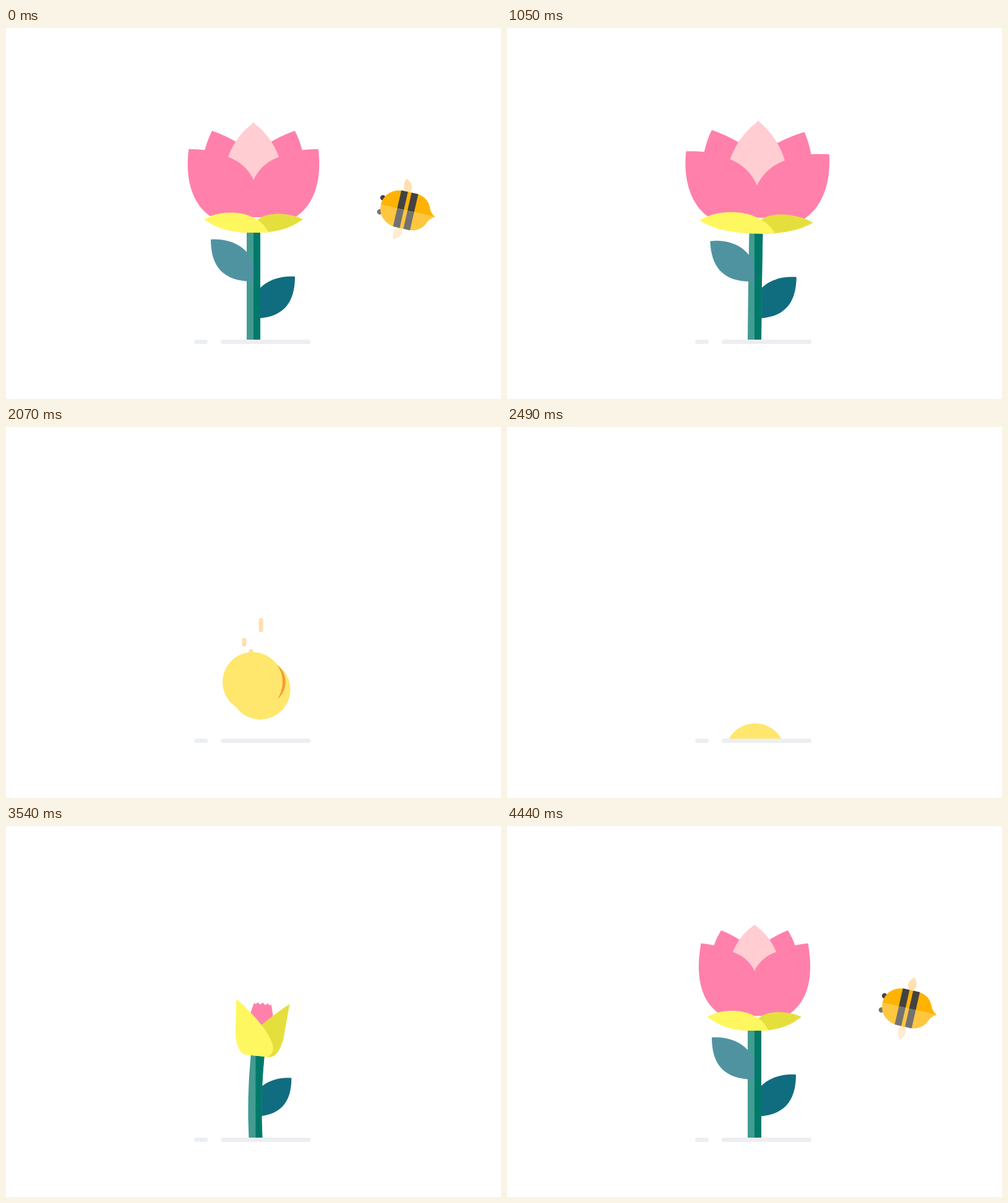
Recreate the animation shown at these times as an HTML page with a canvas. Size 800x600 px, loop 4.47 s.

```html
<!DOCTYPE html>
<html lang="en">
<head>
<meta charset="utf-8">
<title>Flower and bee</title>
<style>
html, body { margin: 0; width: 100%; height: 100%; overflow: hidden; background: #fff; }
canvas { display: block; }
</style>
</head>
<body>
<canvas id="stage" width="800" height="600"></canvas>
<script>
const ctx = document.getElementById('stage').getContext('2d');
const LOOP = 4470, STEP = 30, GROUND = 504, RAD = Math.PI / 180, TURN = 2 * Math.PI;

// ---------- easing and keys ----------
const smooth = u => u * u * (3 - 2 * u);
const linear = u => u;
const easeIn = u => u * u;
const easeOut = power => u => 1 - (1 - u) ** power;
const mix = (a, b, k) => a + (b - a) * k;
const span = (t, from, to) => Math.min(1, Math.max(0, (t - from) / (to - from)));

function backOut(u) {
  const s = 2.1, v = u - 1;
  return 1 + v * v * ((s + 1) * v + s);
}

// Keys are [time, values, easing into the key].
function track(keys, t) {
  const next = keys.findIndex(key => t <= key[0]);
  if (next === 0) return keys[0][1];
  if (next < 0) return keys[keys.length - 1][1];
  const [t0, a] = keys[next - 1], [t1, b, ease = smooth] = keys[next];
  const k = ease(span(t, t0, t1));
  return a.map((v, i) => mix(v, b[i], k));
}

// Times run from -1740 (sprouting) through 0 (in bloom) to 2520 (seed gone).
// petals: radius, fan angle in degrees
const petalKeys = [
  [-1200, [33, 6]],
  [-660, [140, 5]],
  [-540, [215, 5]],
  [-480, [208, 5]],
  [-120, [163, 12]],
  [-30, [171, 18.4], easeIn],
  [540, [182, 24.3], easeOut(18)]
];
// sepals: how far wrapped around the bud, tip distance out, tip height
const sepalKeys = [
  [-1200, [0, 35, 37]],
  [-660, [1, 51.5, 140]],
  [-540, [1, 51.5, 215]],
  [-480, [1, 51.5, 209]],
  [-30, [0, 76, 22]],
  [540, [0, 92, 19], easeOut(5.4)]
];
const ballKeys = [
  [1830, [-60]], [2070, [412.5], easeIn], [2100, [452], linear],
  [2220, [392], easeOut(2)], [2520, [560], easeIn]
];

// ---------- drawing helpers ----------
function fillShape(color, build) {
  ctx.fillStyle = color;
  ctx.beginPath();
  build();
  ctx.fill();
}

const disc = (color, x, y, r) => fillShape(color, () => ctx.arc(x, y, r, 0, TURN));

function bar(color, x0, y0, x1, y1) {
  ctx.strokeStyle = color;
  ctx.lineWidth = 7;
  ctx.lineCap = 'round';
  ctx.beginPath();
  ctx.moveTo(x0, y0);
  ctx.lineTo(x1, y1);
  ctx.stroke();
}

function placed(x, y, angle, sx, sy, draw) {
  ctx.save();
  ctx.translate(x, y);
  ctx.rotate(angle * RAD);
  ctx.scale(sx, sy);
  draw();
  ctx.restore();
}

function clipped(x, y, w, h, draw) {
  ctx.save();
  ctx.beginPath();
  ctx.rect(x, y, w, h);
  ctx.clip();
  draw();
  ctx.restore();
}

// ---------- flower ----------
function stem(x, y, tilt, foot) {
  const c = Math.cos(tilt * RAD), s = Math.sin(tilt * RAD), half = (GROUND - y) / 2, w = 11;
  const cx = x - s * half, cy = y + c * half;
  const shape = color => fillShape(color, () => {
    ctx.moveTo(foot - w, GROUND);
    ctx.quadraticCurveTo(cx - w, cy, x - w * c, y - w * s);
    ctx.lineTo(x + w * c, y + w * s);
    ctx.quadraticCurveTo(cx + w, cy, foot + w, GROUND);
  });
  shape('#429c91');
  clipped(foot, 0, 100, GROUND, () => shape('#00796b'));
}

function leaf(color, x, y, side, size, angle) {
  placed(x, y, angle, side * size, size, () => fillShape(color, () => {
    ctx.moveTo(-69, -68);
    ctx.bezierCurveTo(-38, -71, -5, -55, 0, -25);
    ctx.lineTo(0, 0);
    ctx.bezierCurveTo(-50, 0, -69, -25, -69, -68);
  }));
}

// All petal corners sit on a fan: a multiple of the fan angle, cut in by a depth that grows with it.
function petals(radius, fan) {
  const at = (turn, depth) => {
    const r = radius * (1 - depth * fan), a = turn * fan * RAD;
    return [-r * Math.sin(a), -r * Math.cos(a)];
  };
  const bend = ([x0, y0], [x1, y1], bulge) => [
    (x0 + x1) / 2 + (y1 - y0) * bulge, (y0 + y1) / 2 - (x1 - x0) * bulge
  ];
  const curve = (from, to, bulge) => ctx.quadraticCurveTo(...bend(from, to, bulge), ...to);
  const outer = at(1.71, .0017), notch = at(1.38, .0058), inner = at(1, 0);
  const gap = at(.5, .0071), top = at(0, 0);
  const size = radius / 178;
  const foot = [-size * fan * (2.2 + .038 * fan), -25 * size];
  const flank = [-size * 23.8 * Math.sqrt(fan), -.45 * radius];

  for (const side of [-1, 1]) placed(0, 0, 0, side, 1, () => fillShape('#ff80ab', () => {
    ctx.moveTo(.6, foot[1]);
    ctx.lineTo(...foot);
    ctx.bezierCurveTo(mix(foot[0], flank[0], .63), mix(foot[1], flank[1], .31), ...flank, ...outer);
    curve(outer, notch, .03);
    curve(notch, inner, .06);
    curve(inner, gap, .05);
    ctx.lineTo(...top);
    ctx.lineTo(.6, top[1]);
  }));

  const shown = span(fan, 6, 14);
  if (!shown) return;
  const wing = at(.84 * shown, .0124 * shown), low = at(0, .0235 * shown);
  for (const side of [-1, 1]) placed(0, 0, 0, side, 1, () => fillShape('#ffcdd2', () => {
    ctx.moveTo(.6, low[1]);
    ctx.lineTo(...low);
    curve(low, wing, -.2);
    curve(wing, top, .15);
    ctx.lineTo(.6, top[1]);
  }));
}

function sepal(color, side, wrap, out, high) {
  const corner = 28 * wrap, reach = (out - 35) * .55;
  const front = mix(side > 0 ? reach : 0, out, wrap);
  const sag = side > 0 ? 0 : 3;
  placed(0, 0, 0, side, 1, () => fillShape(color, () => {
    ctx.moveTo(-out, -high);
    ctx.bezierCurveTo(
      -out + mix(out * .31, 36, wrap), -high + mix((30 - out) * .34, 39, wrap) + sag,
      mix(reach * .2, out, wrap), mix(-28 - reach * .48, -high * .455, wrap) + sag,
      front, -corner);
    ctx.quadraticCurveTo(front, 0, front - corner, 0);
    ctx.lineTo(mix(-out * .2, corner - out, wrap), 0);
    ctx.quadraticCurveTo(-out * mix(.55, 1, wrap), mix(-2, 0, wrap), -out * mix(.8, 1, wrap), mix(-high * .55, -corner, wrap));
  }));
}

function flower(t) {
  if (t < -1740 || t > 1980) return;
  const grown = t + 1440;
  const rock = -20 * Math.exp(-grown / 408) * Math.cos(grown / 960 * TURN) * (1 - span(t, -260, -60));
  const gust = span(t, 800, 1350);
  const sway = 4.2 * Math.sin(gust * TURN);
  const flutter = 2.4 * Math.cos(gust * TURN) * Math.sin(gust * Math.PI);
  const [wrap, out, high] = track(sepalKeys, t);
  const tilt = rock + sway;
  const x = 400 + 1.17 * rock + 2 * sway;
  const y = mix(551, 331, easeOut(1.4)(span(t, -1740, -600))) + 4 * wrap + 1.2 * Math.abs(sway);
  const sink = 370 * easeIn(span(t, 1680, 1950));

  placed(0, sink, 0, 1, 1, () => {
    leaf('#106d7f', 398, 470, -1, backOut(span(t, -1020, -690)), -flutter * .3);
    stem(x, y, tilt, 400 + .6 * rock);
    leaf('#5093a0', 400, 410, 1, backOut(span(t, -870, -540)), flutter);
    placed(x, y, tilt, 1, 1, () => {
      petals(...track(petalKeys, t));
      sepal('#e5df3e', -1, wrap, out, high);
      sepal('#fff75f', 1, wrap, out, high);
    });
  });
}

// ---------- falling seed ----------
function ball(t) {
  if (t < 1830 || t > 2520) return;
  const [y] = track(ballKeys, t);
  const spread = 1 - smooth(span(t, 2070, 2190));
  const x = 401 - 2.5 * spread;
  if (t < 2130) {
    const streak = (dx, from, to) => bar('#fddfb0', x + dx, y - from, x + dx, y - to);
    streak(13.5, 100, 84);
    streak(-13.5, 68, 61);
    streak(-2.5, 50, 40);
  }
  disc('#ffe76d', x + 12.5 * spread, y + 12 * spread, 48.5);
  disc('#f79a38', x + 18 * spread, y, 35.3);
  disc('#ffe76d', x, y, 48.5);
}

// ---------- bee ----------
function wing(color, side, angle) {
  placed(-1, 28 * side, angle * side, 1, side, () => fillShape(color, () => {
    ctx.moveTo(0, 0);
    ctx.bezierCurveTo(-9, 6, -9, 14, 0, 24);
    ctx.bezierCurveTo(9, 14, 9, 6, 0, 0);
  }));
}

function beeHalf(side, body, stripe) {
  const h = 30;
  placed(0, 0, 0, 1, side, () => {
    fillShape(body, () => {
      ctx.moveTo(-41, 0);
      ctx.bezierCurveTo(-41, 18, -27, h, -8, h);
      ctx.lineTo(10, h);
      ctx.bezierCurveTo(25, h, 34, 22, 38, 11);
      ctx.quadraticCurveTo(41, 4, 49, 0);
    });
    ctx.fillStyle = stripe;
    for (const x of [-14, 3]) ctx.fillRect(x, 0, 11, h);
  });
}

function bee(t) {
  if (t < -640 || t > 1070) return;
  const arrive = Math.exp(-(t + 480) / 130);
  const drift = smooth(span(t, 0, 540));
  const leave = span(t, 570, 1040);
  const x = 642 + 156 * arrive + 8.5 * drift - 760 * leave ** 1.5;
  const y = 294.5 + 14 * arrive - 6.5 * drift - 225 * leave;
  const flap = 10 + 22 * Math.sin((t / 160 + 1 / 12) * TURN);
  placed(x, y, 13 - 7 * arrive, 1, 1, () => {
    wing('#ffe0b2', -1, flap);
    wing('#ffecd1', 1, flap);
    disc('#424242', -40.3, -11.7, 4.3);
    disc('#727272', -40.3, 11.7, 4.3);
    beeHalf(-1, '#ffb300', '#424242');
    beeHalf(1, '#ffc640', '#727272');
  });
}

// ---------- loop ----------
function render(now) {
  const clock = Math.floor(now % LOOP / STEP) * STEP;
  const t = clock < 2610 ? clock : clock - LOOP;
  ctx.fillStyle = '#fff';
  ctx.fillRect(0, 0, 800, 600);
  bar('#ebeff3', 307.5, 507.5, 322.5, 507.5);
  bar('#edeef2', 350.5, 507.5, 488.5, 507.5);
  clipped(0, 0, 800, GROUND, () => {
    flower(t);
    ball(t);
  });
  bee(t);
}

const start = performance.now();
function tick() {
  render(performance.now() - start);
  requestAnimationFrame(tick);
}
tick();
</script>
</body>
</html>
```
